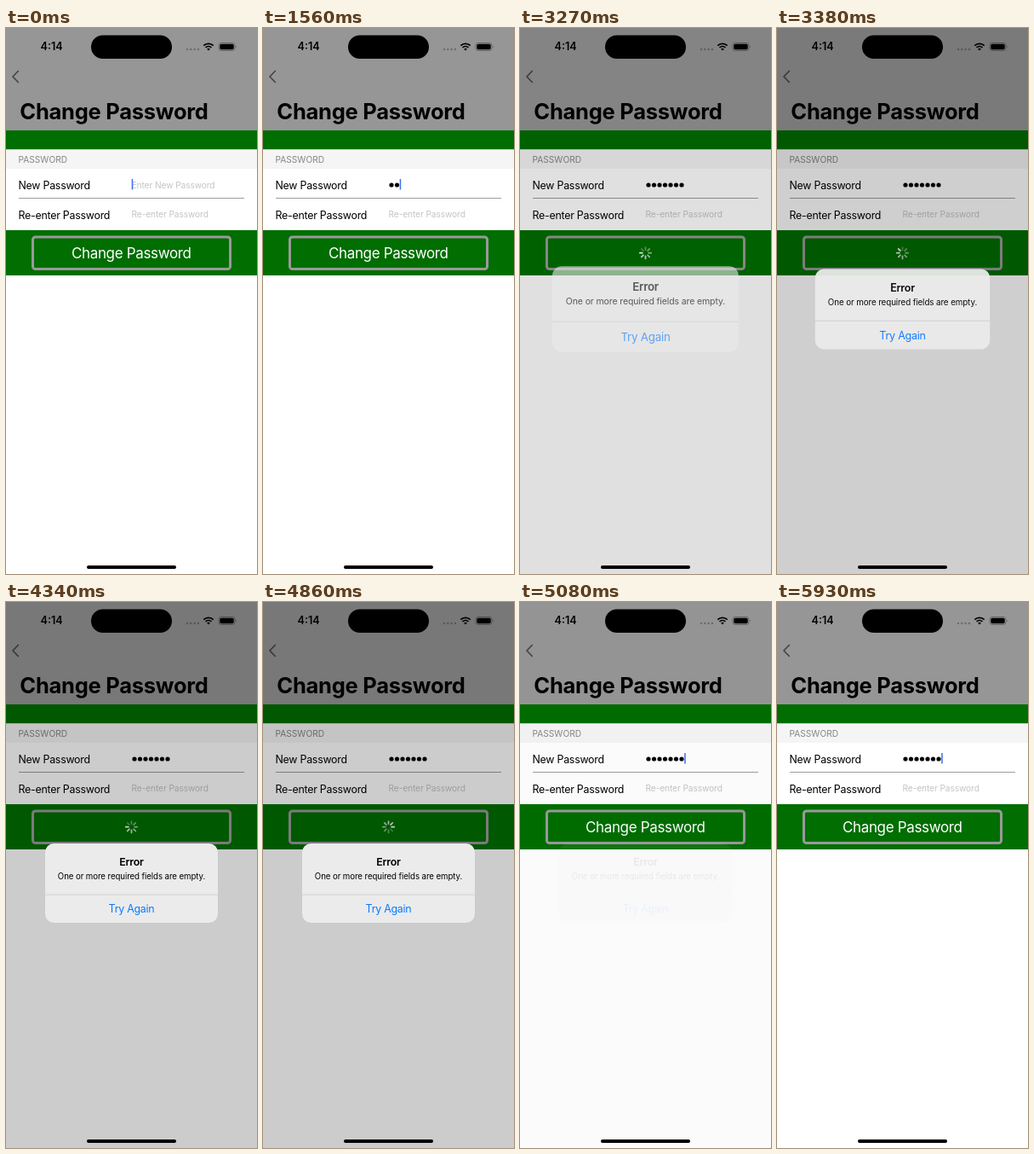
Recreate the animation shown at these times as an HTML page. Size 295x640 px, loop 5970 ms.

```html
<!DOCTYPE html>
<html lang="en">
<head>
<meta charset="utf-8">
<title>Change Password</title>
<style>
html, body { margin: 0; width: 100%; height: 100%; overflow: hidden; background: #fff; }
svg { display: block; width: 100%; height: 100%; }
text { font: 12.4px Inter, Roboto, sans-serif; font-optical-sizing: none; letter-spacing: -.02em; white-space: pre; }
.mid { text-anchor: middle; }
.title { font-size: 25.5px; font-weight: 700; letter-spacing: -.01em; }
.clock { font-size: 12.6px; font-weight: 600; letter-spacing: 0; }
.section { font-size: 10.2px; letter-spacing: 0; fill: #858585; }
.hint { font-size: 10.2px; letter-spacing: -.01em; fill: #c4c4c6; }
.button { font-size: 17px; fill: #fff; }
.bold { font-weight: 600; }
.message { font-size: 9.7px; letter-spacing: -.01em; }
</style>
</head>
<body>
<svg viewBox="0 0 295 640">
  <rect width="295" height="640" fill="#fff"/>
  <rect width="295" height="120" fill="#969696"/>
  <rect y="120" width="295" height="22.5" fill="#006e00"/>
  <rect y="142.5" width="295" height="22.5" fill="#f5f5f5"/>
  <rect y="237" width="295" height="53" fill="#006e00"/>

  <text class="clock" x="40.5" y="26.3">4:14</text>
  <rect x="100" y="8.5" width="95" height="27.5" rx="13.75"/>
  <g fill="#6c6c6c">
    <circle cx="213" cy="25" r="1.2"/><circle cx="217.3" cy="25" r="1.2"/>
    <circle cx="221.6" cy="25" r="1.2"/><circle cx="225.9" cy="25" r="1.2"/>
  </g>
  <g fill="none" stroke="#000" stroke-width="1.7">
    <path d="M232.3 20.6a8.2 8.2 0 0 1 11.4 0M234.5 23a5 5 0 0 1 7 0"/>
    <path d="M238 26.6l-1.8-1.9a2.6 2.6 0 0 1 3.6 0z" fill="#000" stroke="none"/>
  </g>
  <rect x="250" y="17.5" width="19" height="9" rx="2.8" fill="none" stroke="#5c5c5c" stroke-width=".8"/>
  <rect x="251.3" y="18.8" width="16.4" height="6.4" rx="1.6"/>
  <path d="M270.4 20.5q1.3 1.5 0 3z" fill="#5c5c5c"/>
  <path d="M14.3 50.5L8 57l6.3 6.5" fill="none" stroke="#454545" stroke-width="1.7" stroke-linecap="round" stroke-linejoin="round"/>
  <text class="title" x="16.3" y="107.3">Change Password</text>

  <text class="section" x="14.5" y="157.8">PASSWORD</text>
  <text x="14.5" y="188.7">New Password</text>
  <text x="14.5" y="223.5">Re-enter Password</text>
  <rect x="15" y="199" width="265" height="1" fill="#9c9c9c"/>
  <text class="hint" id="hint" x="147.5" y="187.8">Enter New Password</text>
  <text class="hint" x="147.5" y="222.4">Re-enter Password</text>
  <g id="dots"></g>
  <rect id="caret" y="177" width="1.5" height="12.5" fill="#3c6ff0"/>

  <rect x="31.5" y="245" width="232" height="37.5" rx="3" fill="none" stroke="#999" stroke-width="3"/>
  <text class="button mid" id="label" x="147.3" y="270.2">Change Password</text>
  <g id="spinner" transform="translate(147.5 263.7)" stroke="#fff" stroke-width="1.7" stroke-linecap="round"></g>

  <rect id="dim" width="295" height="640"/>
  <g id="alert">
    <rect x="46" y="283" width="203" height="93" rx="10.5" fill="#ebebeb"/>
    <path id="pressed" d="M46 343h203v22.5a10.5 10.5 0 0 1-10.5 10.5h-182a10.5 10.5 0 0 1-10.5-10.5z" fill-opacity=".07"/>
    <rect x="46" y="342.7" width="203" height=".7" fill="#c6c6c8"/>
    <text class="bold mid" x="147.5" y="309.3">Error</text>
    <text class="message mid" x="147.5" y="324.7">One or more required fields are empty.</text>
    <text class="mid" x="147.5" y="364.3" fill="#087aff">Try Again</text>
  </g>
  <rect x="95" y="630" width="105" height="4" rx="2"/>
</svg>
<script>
const LOOP = 5970;
const PITCH = 6.5;
// The screen refreshes only at these moments.
const TICKS = [0, 540, 660, 900, 1020, 1290, 1560, 1660, 1770, 1950, 2540, 2660, 2900, 3010,
  3150, 3270, 3380, 3490, 3610, 3730, 3840, 3940, 4090, 4190, 4340, 4440, 4550, 4650, 4760, 4860,
  4970, 5080, 5190, 5310, 5420, 5530, 5640, 5810, 5930];
const TYPED = [[0, 0], [1560, 2], [1660, 3], [1770, 4], [1950, 6], [2540, 7]];
const CARET = [[0, 1], [540, .5], [660, 0], [900, .5], [1020, 1], [1290, 0], [1560, 1], [2540, .5],
  [2660, 0], [2900, .5], [3010, 1], [3270, 0], [4970, 1], [5640, 0], [5810, .5], [5930, 1]];
const LABEL = [[0, 1], [3010, .75], [3270, 0], [5080, 1]];

const $ = id => document.getElementById(id);
const valueAt = (keys, t) => keys.findLast(k => k[0] <= t)[1];
const set = (el, name, value) => el.setAttribute(name, value);

function add(parent, tag, attrs) {
  const el = document.createElementNS(parent.namespaceURI, tag);
  for (const name in attrs) set(el, name, attrs[name]);
  return parent.appendChild(el);
}

// Critically damped spring from 0 to 1.
function spring(ms) {
  const x = Math.max(0, ms) * .0228;
  return 1 - (1 + x) * Math.exp(-x);
}

const dots = Array.from({ length: 7 }, (_, i) =>
  add($('dots'), 'circle', { cx: 151 + PITCH * i, cy: 184, r: 2.6 }));
const spokes = Array.from({ length: 8 }, (_, i) =>
  add($('spinner'), 'line', { y1: -3.6, y2: -6.7, transform: `rotate(${i * 45})` }));

function draw(t) {
  const typed = valueAt(TYPED, t);
  dots.forEach((d, i) => set(d, 'opacity', i < typed ? 1 : 0));
  set($('hint'), 'opacity', typed ? 0 : 1);
  set($('caret'), 'x', 147.7 + PITCH * typed);
  set($('caret'), 'opacity', valueAt(CARET, t));

  const label = valueAt(LABEL, t);
  set($('label'), 'opacity', label);
  set($('spinner'), 'opacity', label ? 0 : 1);
  const head = Math.floor(t / 125) + 4;
  spokes.forEach((s, i) => set(s, 'opacity', 1 - .1 * ((head - i) % 8)));

  const entered = spring(t - 3181);
  const shown = entered - spring(t - 4889);
  const scale = 1.2 - .2 * entered;
  set($('dim'), 'opacity', .2 * shown);
  set($('alert'), 'opacity', shown);
  set($('alert'), 'transform', `translate(147.5 329.5) scale(${scale}) translate(-147.5 -329.5)`);
  set($('pressed'), 'opacity', t >= 4440 && t < 4860 ? 1 : 0);
}

const start = performance.now();
function frame() {
  const t = (performance.now() - start) % LOOP;
  draw(TICKS.findLast(tick => tick <= t));
  requestAnimationFrame(frame);
}
frame();
</script>
</body>
</html>
```
